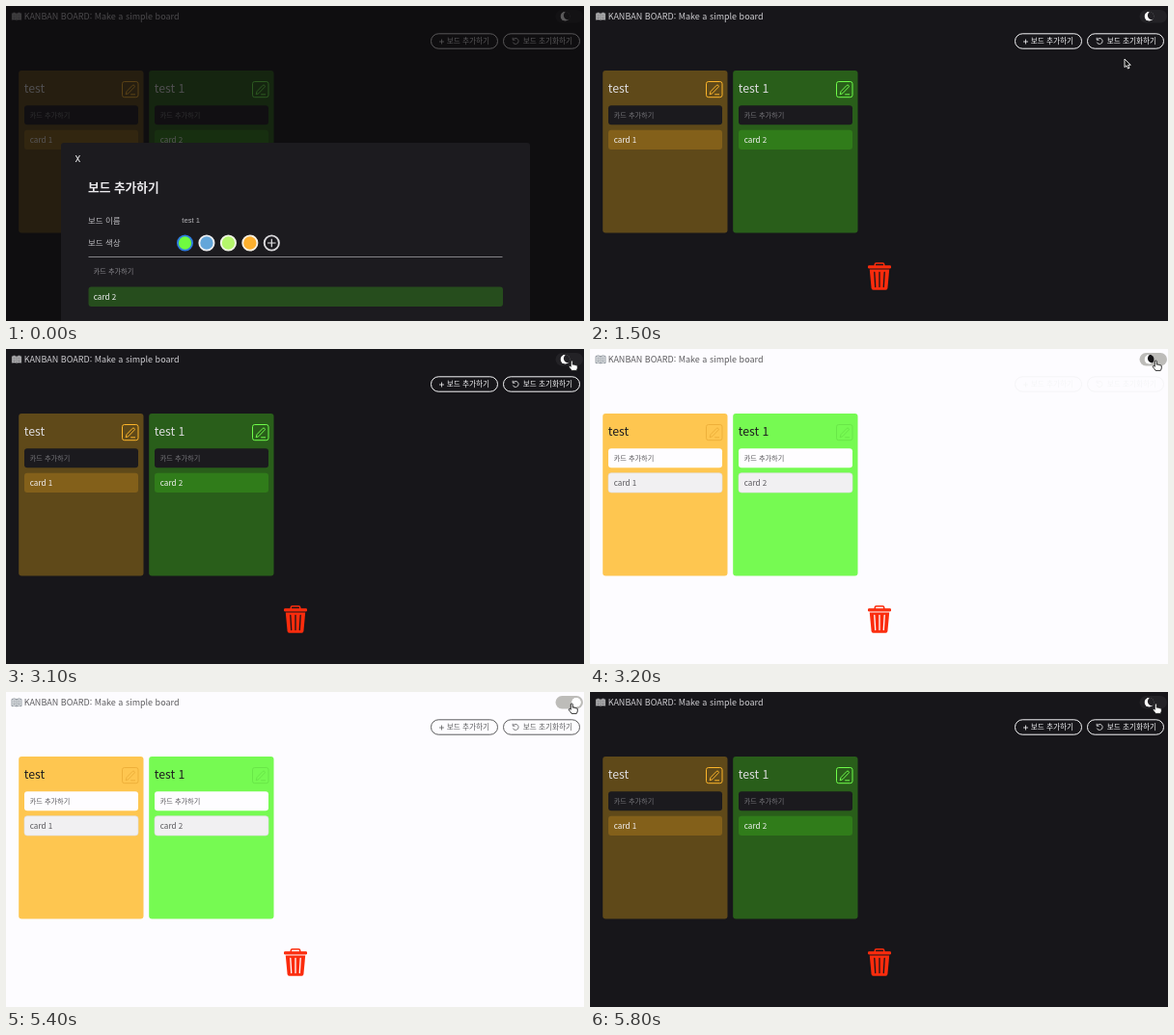
Animation, 599 px wide and 327 px high, one loop 6000 ms. Source, as an HTML page:

```html
<!DOCTYPE html>
<html lang="ko">
<head>
<meta charset="utf-8">
<title>Kanban board</title>
<style>
  html, body { margin: 0; width: 100%; height: 100%; overflow: hidden; background: #17161a; }
  svg { display: block; width: 599px; height: 327px; font-family: "Noto Sans CJK KR", "Noto Sans CJK JP", "Noto Sans CJK", sans-serif; }
  text { white-space: pre; }
  #stage {
    --bg: #17161a; --title: #cfced2; --head: #dddcdf; --input: #1b1a1e; --hint: #77767b; --card-text: #f3f2f4;
    --track: #232226; --cut: #232226; --page: #c9c9cb; --ink: #47464a; --edge: none;
    --b0: #5f4919; --c0: #83601a; --i0: #fdb52a;
    --b1: #295e1a; --c1: #307c1a; --i1: #6ffc4a;
  }
  #stage.light {
    --bg: #fdfcff; --title: #5c5b5e; --head: #1d1c1f; --input: #fefdff; --hint: #555458; --card-text: #59585c;
    --track: #bdbcb9; --cut: #131215; --page: #eceef0; --ink: #6d7680; --edge: #dddce0;
    --b0: #fec650; --c0: #f1f0f2; --i0: #eeb03a;
    --b1: #76fa52; --c1: #f1f0f2; --i1: #69e748;
  }
  .btn { fill: none; stroke: var(--btn); }
  .btn-text { fill: var(--btn); font-size: 7.65px; }
  .hint { fill: var(--hint); font-size: 7.15px; }
  .card { font-size: 8.1px; }
</style>
</head>
<body>
<svg id="stage" viewBox="0 0 599 327">
  <defs><clipPath id="knobClip"><circle r="5"/></clipPath></defs>
  <rect width="599" height="327" style="fill:var(--bg)"/>

  <g id="book">
    <path d="M6 7.5Q8.6 6.2 11 7.6Q13.4 6.2 16 7.5V14.7Q13.4 13.6 11 14.9Q8.6 13.6 6 14.7Z" style="fill:var(--page);stroke:var(--ink);stroke-width:.7"/>
    <path d="M11 7.6V14.8M7.3 9H9.8M7.3 10.8H9.8M7.3 12.5H9.8M12.2 9H14.7M12.2 10.8H14.7M12.2 12.5H14.7" style="stroke:var(--ink);stroke-width:.7"/>
  </g>
  <text x="18.7" y="14.1" font-size="9" font-weight="500" style="fill:var(--title)">KANBAN BOARD: Make a simple board</text>

  <rect x="569.5" y="4" width="28.5" height="13.5" rx="6.75" style="fill:var(--track)"/>
  <g id="knob"><g clip-path="url(#knobClip)">
    <circle r="5" fill="#fff"/>
    <circle id="cut" cx="3" cy="-1" r="4.6" style="fill:var(--cut)"/>
  </g></g>

  <g id="buttons">
    <rect class="btn" x="440.5" y="28.8" width="69" height="15.4" rx="7.7"/>
    <path class="btn" stroke-width=".8" d="M449 37H454M451.5 34.5V39.5"/>
    <text class="btn-text" x="456.8" y="39.4">보드 추가하기</text>
    <rect class="btn" x="515.5" y="28.8" width="79" height="15.4" rx="7.7"/>
    <path class="btn" stroke-width=".8" d="M525.6 34.8A3 3 0 1 1 525.3 37.6M525.2 32.8V35.2H527.6"/>
    <text class="btn-text" x="535.8" y="39.4">보드 초기화하기</text>
  </g>

  <g id="boards"></g>

  <g id="trash" fill="#fb2c0d">
    <path d="M295.3 270V268.3Q295.3 267 296.7 267H303.3Q304.7 267 304.7 268.3V270" fill="none" stroke="#fb2c0d" stroke-width="1.5"/>
    <rect x="288" y="269.3" width="24" height="3.2" rx="1.2"/>
    <path d="M289.8 273.5H310.2L308.4 293Q308.2 294.8 306.5 294.8H293.5Q291.8 294.8 291.6 293Z"/>
    <path d="M294.8 276.5L295.7 291.5M300 276.5V291.5M305.2 276.5L304.3 291.5" style="stroke:var(--bg);stroke-width:1.3;stroke-linecap:round"/>
  </g>

  <g id="modal">
    <rect width="599" height="327" fill="#0c0b0d" opacity=".68"/>
    <path d="M57 327V145Q57 142 60 142H540Q543 142 543 145V327Z" fill="#1c1b1f"/>
    <text x="71.6" y="162.3" font-size="9.2" font-family="Roboto, sans-serif" fill="#f2f2f3">X</text>
    <text x="85" y="192.7" font-size="12.7" font-weight="700" fill="#e9e8eb">보드 추가하기</text>
    <g font-size="8.5" fill="#bab9bd">
      <text x="85" y="225.7">보드 이름</text>
      <text x="85" y="249.1">보드 색상</text>
    </g>
    <text x="182.3" y="225" font-size="7.6" font-family="'Liberation Sans', sans-serif" fill="#b5b4b8">test 1</text>
    <g id="swatches"></g>
    <path d="M85.5 260.5H514.5" stroke="#858488"/>
    <text x="90.8" y="278.2" font-size="7.15" fill="#8b8a8f">카드 추가하기</text>
    <rect x="85.5" y="291.5" width="429.5" height="20.5" rx="3" fill="#264d1d"/>
    <text class="card" x="90.8" y="304.8" fill="#f3f2f4">card 2</text>
  </g>

  <path id="arrow" d="M0 0V8.6L2 6.8L3.5 10L5 9.3L3.6 6.2H6.3Z" fill="#111" stroke="#fff" stroke-width=".9"/>
  <path id="hand" d="M-1 .6Q0 -.5 1 .6V4.2Q2 3.5 2.8 4.5Q3.8 3.9 4.5 4.9Q5.8 4.4 6 5.8V7.8Q5.8 9 5 10.4H-.2Q-1 8.8 -2.9 6.8Q-3.3 5.4 -2 5.4L-1 6.3Z" fill="#fff" stroke="#1a1a1a" stroke-width=".9"/>
</svg>
<script>
const LOOP = 6000, MODAL_END = 300, TO_LIGHT = 3190, TO_DARK = 5490, FADE = 300;
const el = id => document.getElementById(id);
const stage = el('stage');

const board = (i, name, card) => `<g transform="translate(${i * 135} 0)">
  <rect x="13.2" y="67" width="129.3" height="168.5" rx="3" style="fill:var(--b${i})"/>
  <text x="18.8" y="89.7" font-size="12.3" font-weight="500" style="fill:var(--head)">${name}</text>
  <g style="fill:none;stroke:var(--i${i})">
    <rect x="120.5" y="78.5" width="16.5" height="16.2" rx="2.2"/>
    <path d="M124.2 91.8L125 88.7L131.2 82.3Q132.2 81.6 133 82.5Q133.8 83.4 133 84.2L126.8 90.7ZM129.2 91.8H134"/>
  </g>
  <rect x="19" y="103.3" width="118" height="20" rx="3" style="fill:var(--input)"/>
  <text class="hint" x="24.8" y="115.9">카드 추가하기</text>
  <rect x="19" y="128.7" width="118" height="20.3" rx="3" style="fill:var(--c${i});stroke:var(--edge);stroke-width:.6"/>
  <text class="card" x="24.8" y="142.1" style="fill:var(--card-text)">${card}</text>
</g>`;
el('boards').innerHTML = board(0, 'test', 'card 1') + board(1, 'test 1', 'card 2');

const swatches = [['#6ffb3f', '#2d7be0'], ['#63a6da', '#eeeef0'], ['#b5f66c', '#f0f3e6'], ['#fdb02f', '#f6f0e4'], ['none', '#dcdbde']];
el('swatches').innerHTML = swatches.map(([fill, ring], i) =>
  `<circle cx="${185.5 + i * 22.45}" cy="246" r="7.6" fill="${fill}" stroke="${ring}" stroke-width="1.9"/>`).join('') +
  '<path d="M271 246H279.6M275.3 241.7V250.3" stroke="#e6e5e8" stroke-width="1.2"/>';

// time, x, y of the pointer tip
const path = [[1100, 420, 190], [1400, 549, 70], [1500, 554, 55], [1900, 586.3, 12]];
const clamp = v => Math.min(1, Math.max(0, v));
const smooth = v => v * v * (3 - 2 * v);
const mix = (a, b, p) => a + (b - a) * p;

function pointer(t) {
  const k = path.findIndex(p => p[0] > t);
  if (k < 0) return path[path.length - 1].slice(1);
  const [a, b] = [path[k - 1], path[k]];
  const p = smooth((t - a[0]) / (b[0] - a[0]));
  return [mix(a[1], b[1], p), mix(a[2], b[2], p)];
}

function draw(t) {
  const light = t >= TO_LIGHT && t < TO_DARK;
  const p = smooth(clamp((t - TO_LIGHT) / FADE)) - smooth(clamp((t - TO_DARK) / FADE));
  stage.setAttribute('class', light ? 'light' : '');
  const shade = Math.round(mix(246, 92, p));
  stage.style.setProperty('--btn', `rgb(${shade},${shade},${shade + 2})`);
  el('knob').setAttribute('transform', `translate(${mix(579.5, 591, p)} 10.8)`);
  el('cut').setAttribute('r', mix(4.6, 0, p));
  el('modal').style.display = t < MODAL_END ? '' : 'none';

  const shown = t >= path[0][0];
  const [x, y] = shown ? pointer(t) : [0, 0];
  const over = x > 569 && y < 18;
  for (const [id, on] of [['arrow', shown && !over], ['hand', shown && over]]) {
    el(id).style.display = on ? '' : 'none';
    el(id).setAttribute('transform', `translate(${x} ${y})`);
  }
}

const start = performance.now();
function tick() {
  const t = (performance.now() - start) % LOOP;
  draw(Math.floor(t / 100) * 100);
  requestAnimationFrame(tick);
}
tick();
</script>
</body>
</html>
```
